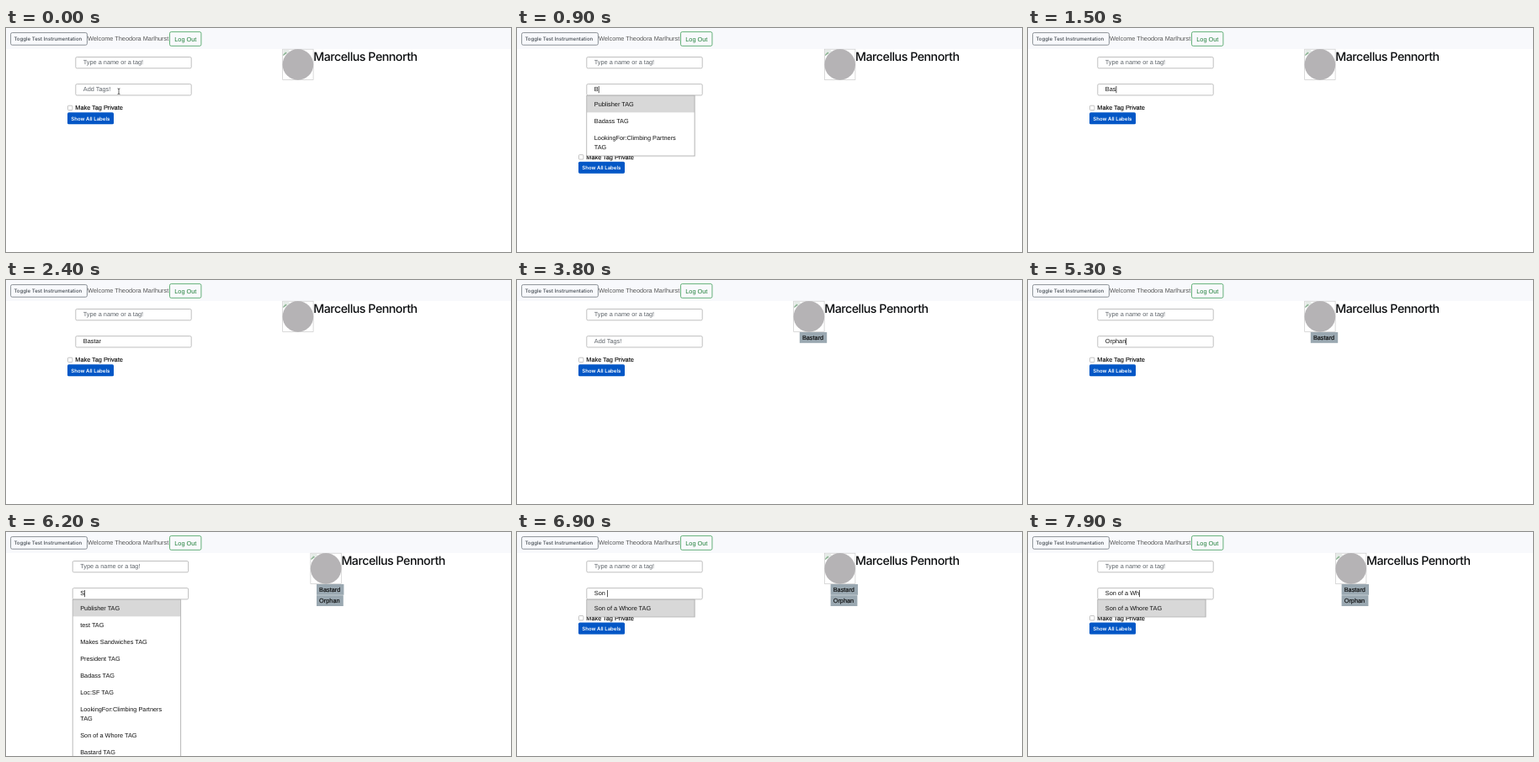
Write an HTML page that moves like this. It is 600 px wide and 266 px high and loops after 8000 ms.

```html
<!DOCTYPE html>
<html lang="en">
<head>
<meta charset="utf-8">
<title>Tagging demo</title>
<style>
  html, body { margin: 0; width: 100%; height: 100%; overflow: hidden; background: #fff; }
  svg { display: block; width: 600px; height: 266px; }
  text { font: 7.33px "Liberation Sans", Arial, sans-serif; fill: #111; white-space: pre; text-rendering: geometricPrecision; }
  .ui { font: 500 6.05px Inter, sans-serif; }
  .title { font: 500 14.2px Inter, sans-serif; letter-spacing: -.47px; fill: #0c0e10; }
  .strong { fill: #000; stroke: #000; stroke-width: .12; }
  .hint { fill: #5c6268; }
  .field { fill: #fff; stroke: #b8b8b8; stroke-width: .9; }
</style>
</head>
<body>
<svg viewBox="0 0 600 266">
  <rect width="600" height="25" fill="#f8f9fc"/>
  <rect x="5.6" y="5.6" width="90.8" height="14.6" rx="1.8" fill="none" stroke="#70777e" stroke-width=".8"/>
  <text class="ui" x="9.4" y="14.9" style="fill:#454c53">Toggle Test Instrumentation</text>
  <text x="97" y="14.5" style="fill:#555">Welcome Theodora Marlhurst</text>
  <rect x="194.5" y="4.6" width="37.4" height="16.7" rx="1.8" fill="none" stroke="#3f9f58" stroke-width=".8"/>
  <text x="200.3" y="15.5" style="fill:#1f7f38">Log Out</text>

  <g id="form">
    <rect class="field" x="82.8" y="34.5" width="137.4" height="13.3" rx="1.5"/>
    <text class="hint" x="91.8" y="43.3">Type a name or a tag!</text>
    <rect class="field" x="82.8" y="66.6" width="137.4" height="13.3" rx="1.5"/>
    <text id="hint" class="hint" x="91.8" y="75.3">Add Tags!</text>
    <text id="query" x="91.8" y="75.3"></text>
    <rect id="caret" y="69" width=".7" height="8.2" fill="#111"/>
    <g id="footer">
      <rect x="73.5" y="92.2" width="5.4" height="5.4" rx=".8" fill="#fff" stroke="#aaa" stroke-width=".7"/>
      <text class="strong" x="82.3" y="97.3">Make Tag Private</text>
      <rect x="73" y="100.3" width="55" height="14" rx="1.6" fill="#0357c6"/>
      <text class="ui" x="77.3" y="109.6" style="fill:#fff;font-weight:600">Show All Labels</text>
    </g>
    <g id="menu"></g>
  </g>

  <g id="profile">
    <rect x="328.7" y="25.2" width="36.4" height="36.4" fill="#fff" stroke="#c9c9c9" stroke-width=".7"/>
    <circle cx="346.9" cy="43.4" r="18.3" fill="#b5b3b5"/>
    <path d="M329.3 25.8h6l2 2-8 5z" fill="#e6ece8"/>
    <path d="M329.3 31.5l3-3 1.6 1.2-4.6 3.6z" fill="#8fb596"/>
    <text class="title" x="365.2" y="39.4">Marcellus Pennorth</text>
    <g id="badges"></g>
  </g>

  <path id="pointer" d="M132.6 71.8q1.4 0 1.4 1q0-1 1.4-1M134 72.6v5.2M132.6 78.6q1.4 0 1.4-1q0 1 1.4 1"
        fill="none" stroke="#222" stroke-width=".7"/>
</svg>
<script>
const LOOP = 8000;
const MENU_TOP = 80.2, ROW = 20.1, TALL_ROW = 31;
const el = id => document.getElementById(id);

const baseTags = ["Publisher", "test", "Makes Sandwiches", "President", "Badass", "Founder", "Cook",
  "Pilot", "Loc:SF", "LookingFor:Climbing Partners", "Son of a Whore"];
const saved = [[3000, "Bastard", 32.4], [5500, "Orphan", 31.8]];

// time, input value, caret visible
const steps = [
  [0, "", 0], [100, "", 1], [500, "B", 1], [1000, "B", 0], [1300, "Ba", 1], [1400, "Bas", 1],
  [1800, "Bast", 1], [1900, "Basta", 1], [2000, "Bastar", 1], [2400, "Bastar", 0], [2500, "Bastard", 1],
  [3000, "", 1], [3500, "", 0], [4000, "O", 1], [4500, "Or", 1], [4700, "Orp", 1], [4800, "Orph", 1],
  [5000, "Orpha", 1], [5100, "Orphan", 1], [5500, "", 1], [6000, "S", 1], [6300, "So", 1],
  [6500, "Son", 1], [6900, "Son ", 1], [7000, "Son o", 1], [7100, "Son of", 1], [7300, "Son of ", 1],
  [7500, "Son of a", 1], [7600, "Son of a ", 1], [7700, "Son of a W", 1], [7800, "Son of a Wh", 1]
];

const rect = (x, y, w, h, attrs) => `<rect x="${x}" y="${y}" width="${w}" height="${h}" ${attrs}/>`;
const label = (x, y, s, cls = "") => `<text class="${cls}" x="${x}" y="${y}">${s}</text>`;
const shift = (id, x, y) => el(id).setAttribute("transform", `translate(${x} ${y})`);
const show = (id, on) => el(id).setAttribute("visibility", on ? "visible" : "hidden");

function menuFor(tags) {
  let y = MENU_TOP, rows = "";
  tags.forEach((tag, i) => {
    const tall = tag.length > 22, h = tall ? TALL_ROW : ROW;
    if (!i) rows += rect(83, y, 128, h, 'fill="#d8d8d8"');
    rows += tall
      ? label(91.8, y + 12.4, tag) + label(91.8, y + 23.5, "TAG")
      : label(91.8, y + 12.4, tag + " TAG");
    y += h;
  });
  const height = y - MENU_TOP + .5;
  const shadow = rect(82.4, MENU_TOP, 129.4, height + .7, 'fill="#000" opacity=".12"');
  const back = rect(82.8, MENU_TOP, 128.2, height, 'fill="#fff"');
  const edge = rect(82.8, MENU_TOP, 128.2, height, 'fill="none" stroke="#aaa" stroke-width=".7"');
  return { height, svg: shadow + back + rows + edge };
}

let shown = -1;
function draw(time) {
  const index = steps.findLastIndex(s => s[0] <= time);
  if (index === shown) return;
  shown = index;
  const [, value, caret] = steps[index];
  const badges = saved.filter(b => b[0] <= time);
  const tags = [...baseTags, ...badges.map(b => b[1])];
  const needle = value.toLowerCase();
  const matches = value ? tags.filter(t => t.toLowerCase().includes(needle)) : [];
  const open = matches.length > 0;
  const menu = open ? menuFor(matches) : { height: 0, svg: "" };
  const nudge = menu.height > 180 ? -3.6 : 0;

  el("menu").innerHTML = menu.svg;
  el("query").textContent = value;
  show("hint", !value);
  show("caret", caret);
  show("pointer", time < 500);
  el("caret").setAttribute("x", 91.9 + (value ? el("query").getComputedTextLength() : 0));
  shift("form", nudge, 0);
  shift("footer", 0, open ? menu.height - 13.3 : 0);
  shift("profile", (open ? 36.8 : 0) + nudge, 0);
  el("badges").innerHTML = badges.map(([, name, width], i) =>
    rect(335.8, 62 + i * 13.2, width, 12.8, 'fill="#9aa8b1"') +
    label(338.9, 70.8 + i * 13.2, name, "strong")).join("");
}

const start = performance.now();
function tick() {
  draw((performance.now() - start) % LOOP);
  requestAnimationFrame(tick);
}
tick();
</script>
</body>
</html>
```
